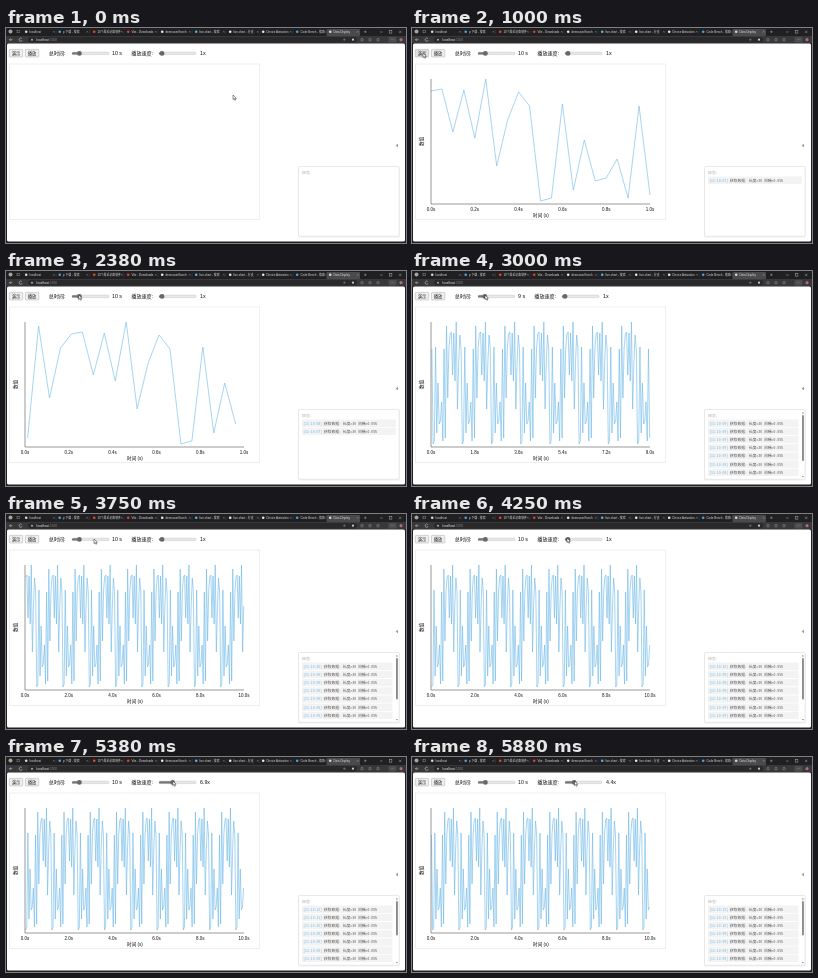
Recreate the animation shown at these times as an HTML page. Size 400 by 215 pixels, loop 6.01 s.

```html
<!DOCTYPE html>
<html lang="zh">
<head>
<meta charset="utf-8">
<title>Data Display</title>
<style>
html, body { margin: 0; width: 100%; height: 100%; overflow: hidden; background: #202022; }
svg { display: block; width: 400px; height: 215px; }
text { font-family: "Liberation Sans", "Noto Sans CJK SC", "Noto Sans CJK", sans-serif; white-space: pre; }
.log text { font-family: "Noto Sans Mono CJK SC", "Noto Sans CJK SC", "Noto Sans CJK", monospace; }
</style>
</head>
<body>
<svg id="stage" viewBox="0 0 400 215">
  <defs>
    <clipPath id="logClip"><rect x="293" y="148" width="99" height="59"/></clipPath>
  </defs>
</svg>
<script>
const NS = 'http://www.w3.org/2000/svg';
const stage = document.getElementById('stage');

function add(tag, attrs, parent = stage) {
  const el = document.createElementNS(NS, tag);
  for (const name in attrs) el.setAttribute(name, attrs[name]);
  parent.appendChild(el);
  return el;
}
const rect = (x, y, width, height, fill, extra, parent) =>
  add('rect', { x, y, width, height, fill, ...extra }, parent);
const line = (d, stroke, width = 0.5, parent) =>
  add('path', { d, stroke, 'stroke-width': width, fill: 'none' }, parent);
const dot = (cx, cy, r, fill, parent) => add('circle', { cx, cy, r, fill }, parent);
function text(str, x, y, size, fill, extra, parent) {
  const el = add('text', { x, y, 'font-size': size, fill, ...extra }, parent);
  el.textContent = str;
  return el;
}
const show = (el, on) => el.setAttribute('visibility', on ? 'visible' : 'hidden');
const middle = { 'text-anchor': 'middle' };

// Browser window
function drawBrowser() {
  rect(0, 0, 400, 215, '#202022');
  rect(0, 8, 400, 7.5, '#38383a');
  dot(4.5, 3.6, 2, '#a9a39a');
  rect(11, 2.2, 2.6, 2.6, 'none', { stroke: '#aaa', 'stroke-width': 0.4 });
  const tabs = [
    ['localhost', 19, '#d8d8d8'], ['p 下载 - 搜索', 52.5, '#4aa3df'],
    ['10个最近必备软件', 87, '#e8472f'], ['Vite - Downloads', 121, '#e0402c'],
    ['demouser/livech', 155, '#e8e8e8'], ['live-chart - 搜索', 189, '#55b5e0'],
    ['live-chart - 分支', 223, '#e8e8e8'], ['Device Activation', 256, '#e8e8e8'],
    ['Code Bench - 搜索', 290, '#48a5dd'], ['Data Display', 323, '#d8d8d8']
  ];
  tabs.forEach(([name, x, color], i) => {
    if (i === 9) rect(x - 2.5, 1, 33.5, 7.2, '#4a4a4d', { rx: 1 });
    else line(`M${x + 31} 2V6`, '#555', 0.3);
    dot(x + 1.2, 3.8, 1.3, color);
    text(name, x + 4.5, 4.8, 2.9, '#ddd');
    line(`M${x + 28} 3l1.6 1.6m0-1.6l-1.6 1.6`, '#bbb', 0.3);
  });
  line('M358 3.8h2.6m-1.3-1.3v2.6M374 4h2.6M393 2.7l2.4 2.4m0-2.4l-2.4 2.4', '#ccc', 0.4);
  rect(383.5, 2.7, 2.4, 2.4, 'none', { stroke: '#ccc', 'stroke-width': 0.4 });

  line('M6.5 11.7H3.5l1.3-1.3m-1.3 1.3l1.3 1.3', '#ddd', 0.5);
  line('M15.8 10.6a1.6 1.6 0 1 0 .4 1.5', '#ddd', 0.5);
  rect(22, 9, 329, 5.4, '#29292b', { rx: 2.7 });
  dot(26, 11.7, 1, '#aaa');
  const url = text('localhost', 30.5, 12.8, 3.2, '#eee');
  add('tspan', { fill: '#888' }, url).textContent = ':5500';
  line('M337 11.7h2.6m-1.3-1.3v2.6', '#aaa', 0.4);
  dot(347, 11.7, 1.1, '#c9c9c9');
  [356, 364, 372].forEach(x =>
    rect(x - 1.1, 10.6, 2.2, 2.2, 'none', { rx: 0.5, stroke: '#bbb', 'stroke-width': 0.4 }));
  rect(382.5, 9, 8, 5.4, '#4d4d50', { rx: 1 });
  text('···', 386.5, 12.7, 4, '#eee', middle);
  dot(395, 11.7, 1.6, '#b06a78');
  rect(1, 15.5, 398, 198, '#fff', { rx: 1.6 });
}

// Page widgets
function button(x, label) {
  const box = rect(x, 21.4, 13.4, 7.6, '#efefef', { rx: 0.8, stroke: '#999', 'stroke-width': 0.4 });
  text(label, x + 6.7, 26.8, 4.3, '#222', middle);
  return box;
}

function slider(x, parent) {
  rect(x, 24.2, 37, 2.4, '#e9e9e9', { rx: 1.2, stroke: '#aaa', 'stroke-width': 0.35 }, parent);
  const fill = rect(x, 24.2, 5, 2.4, '#777', { rx: 1.2 }, parent);
  const knob = dot(x, 25.4, 2.4, '#686868', parent);
  return cx => {
    knob.setAttribute('cx', cx);
    fill.setAttribute('width', cx - x);
  };
}

drawBrowser();
const demoBtn = button(3.3, '演示');
const playBtn = button(19.4, '播放');
text('总时间:', 42.8, 27.2, 5.1, '#111');
const setSpan = slider(66);
const spanText = text('', 106, 27.2, 5.3, '#111');
const speedGroup = add('g', {});
text('播放速度:', 125.3, 27.2, 5.1, '#111', {}, speedGroup);
const setSpeed = slider(153, speedGroup);
const speedText = text('', 194, 27.2, 5.3, '#111', {}, speedGroup);

rect(3.5, 36, 250.3, 155.5, '#fff', { stroke: '#dedede', 'stroke-width': 0.5 });
const chart = add('g', {});
const LEFT = 19, WIDTH = 219, BASE = 176;
const curve = add('polyline', {
  fill: 'none', stroke: '#6cb8e8', 'stroke-width': 0.6, 'stroke-linejoin': 'round'
}, chart);
line(`M${LEFT} 51V${BASE}H${LEFT + WIDTH}`, '#333', 0.5, chart);
const ticks = [0, 1, 2, 3, 4, 5].map(i =>
  text('', LEFT + WIDTH * i / 5, 182.6, 4.5, '#111', middle, chart));
text('时间 (s)', 129, 188.6, 4.6, '#111', middle, chart);
text('数值', 0, 0, 4.6, '#111', { ...middle, transform: 'translate(10.8 113.5) rotate(-90)' }, chart);

add('path', { d: 'M392 115.8v3.4l-2.4-1.7z', fill: '#999' });

rect(292.2, 138.8, 101.6, 70.6, '#000', { rx: 1, opacity: 0.06 });
rect(292.5, 138.5, 100.6, 69.7, '#fff', { rx: 1, stroke: '#d4d4d4', 'stroke-width': 0.5 });
const log = add('g', { class: 'log' });
text('日志:', 296, 145.6, 3.9, '#999', {}, log);
const rowBox = add('g', { 'clip-path': 'url(#logClip)' }, log);
const rows = [0, 1, 2, 3, 4, 5, 6].map(i => {
  const g = add('g', { transform: `translate(296 ${148.6 + i * 8.2})` }, rowBox);
  const back = rect(0, 0, 94, 7.3, '#f3f3f3', { rx: 0.8 }, g);
  const time = text('', 1.2, 5, 3.8, '#74b7e6', {}, g);
  text('获取数据: 长度=30 间隔=0.05s', 21.8, 5, 3.8, '#555', {}, g);
  return { g, back, time };
});
const scrollbar = add('g', {});
add('path', { d: 'M389.9 142.4h2l-1-1.6zM389.9 205h2l-1 1.6z', fill: '#888' }, scrollbar);
const thumb = rect(390, 144, 1.9, 40, '#8b8b8b', { rx: 0.9 }, scrollbar);

const pointer = add('path', {
  d: 'M0 0v4.6l1.1-1 .8 1.7.8-.4-.8-1.6h1.5z', fill: '#fff', stroke: '#111', 'stroke-width': 0.45
});

// Timeline, counted in steps of 125 ms
const STEP = 125, LOOP = 6010, LAST = 47;
const SAMPLES = [64, 78, 173, 170, 76, 162, 112, 153, 150, 131, 170, 78,
  167, 55, 127, 77, 63, 61, 104, 62, 110, 51, 138, 92];
const DT = 0.05;
const SHOW = 7, PLAY = 11, DRAG = 21;
const path = [[0, 227, 67], [1, 190, 58], [3, 70, 36], [5, 11, 25], [8, 11, 25],
  [10, 26, 25], [12, 26, 25], [14, 43, 24], [17, 72, 24], [20, 73, 24], [22, 71.5, 24],
  [24, 73, 24], [27, 74, 24], [30, 88, 25], [34, 155, 24], [35, 156, 24],
  [39, 171, 24], [41, 171, 24], [45, 162.5, 24], [47, 162.5, 24]];
const spans = [[0, 10], [21, 9], [22, 8], [24, 9], [26, 10]];
const speeds = [[0, 1], [35, 1], [36, 2], [39, 9.4], [41, 9.4], [45, 4.4], [47, 4.4]];
const entries = [[7, 7], [11, 8], [21, 8], [22, 9], [22, 9], [23, 9], [23, 9],
  [24, 9], [24, 9], [26, 10], [37, 11], [42, 12]];

function tween(keys, k, col = 1) {
  const next = keys.findIndex(key => key[0] >= k);
  const b = keys[next], a = keys[Math.max(next - 1, 0)];
  return b[0] === a[0] ? b[col] : a[col] + (b[col] - a[col]) * (k - a[0]) / (b[0] - a[0]);
}
const hold = (keys, k) => keys.filter(key => key[0] <= k).pop()[1];

function shiftAt(k) {
  if (k < PLAY) return -0.4;
  let shift = -0.412;
  for (let i = PLAY + 1; i <= k; i++) shift += STEP / 1000 * tween(speeds, i);
  return shift;
}

function drawCurve(shift, range) {
  const points = [], n = SAMPLES.length;
  const first = Math.ceil(shift / DT - 1e-6), end = Math.floor((shift + range) / DT + 1e-6);
  for (let i = first; i <= end; i++) {
    const x = LEFT + (i * DT - shift) / range * WIDTH;
    points.push(x.toFixed(2) + ',' + SAMPLES[(i % n + n) % n]);
  }
  curve.setAttribute('points', points.join(' '));
}

function drawLog(k) {
  const seen = entries.filter(e => e[0] <= k).reverse();
  const overflow = seen.length > rows.length;
  rows.forEach(({ g, back, time }, i) => {
    show(g, seen[i]);
    back.setAttribute('width', overflow ? 90.5 : 94);
    if (seen[i]) time.textContent = `[11:10:${String(seen[i][1]).padStart(2, '0')}]`;
  });
  show(scrollbar, overflow);
  if (overflow) thumb.setAttribute('height', 414 / seen.length);
}

function draw(k) {
  const span = hold(spans, k), speed = tween(speeds, k);
  const range = k < DRAG ? 1 : span;
  setSpan(68 + 0.6 * (span - 1));
  setSpeed(156 + 1.8 * (speed - 1));
  spanText.textContent = span + ' s';
  speedText.textContent = +speed.toFixed(1) + 'x';
  // A one-digit time is narrower, so what follows moves left
  speedGroup.setAttribute('transform', `translate(${span < 10 ? -3 : 0} 0)`);

  show(chart, k >= SHOW);
  drawCurve(shiftAt(k), range);
  ticks.forEach((tick, i) => tick.textContent = (range * i / 5).toFixed(1) + 's');
  drawLog(k);

  demoBtn.setAttribute('fill', k >= 5 && k < 9 ? '#e0e0e0' : '#efefef');
  playBtn.setAttribute('fill', k >= 10 && k < 13 ? '#e0e0e0' : '#efefef');
  pointer.setAttribute('transform', `translate(${tween(path, k)} ${tween(path, k, 2)})`);
}

const start = performance.now();
let shown = -1;
function tick() {
  const t = (performance.now() - start) % LOOP;
  const k = Math.min(LAST, Math.floor(Math.floor(t / 10) * 10 / STEP));
  if (k !== shown) draw(shown = k);
  requestAnimationFrame(tick);
}
tick();
</script>
</body>
</html>
```
